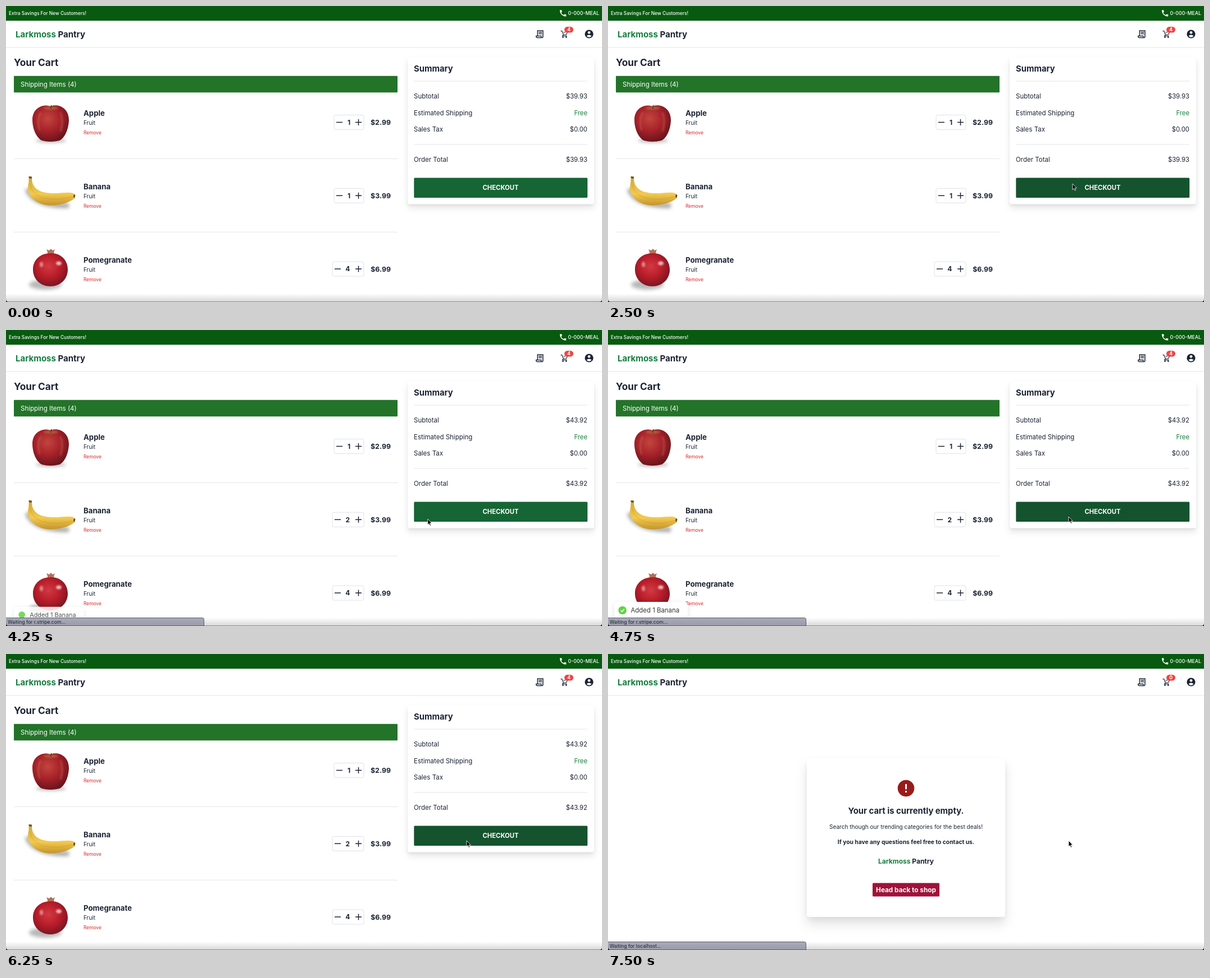
Animation, 1061 px wide and 528 px high, one loop 8000 ms. Source, as an HTML page:

```html
<!DOCTYPE html>
<html lang="en">
<head>
<meta charset="utf-8">
<title>Shopping cart</title>
<style>
  html, body { margin: 0; width: 100%; height: 100%; overflow: hidden; background: #fff; }
  svg { display: block; width: 1061px; height: 528px; font-family: Inter, "Open Sans", sans-serif; }
  text { fill: #1b2434; white-space: pre; }
  .b { font-weight: 700; }
  .m { font-weight: 500; }
  .end { text-anchor: end; }
  .mid { text-anchor: middle; }
  .white { fill: #fff; }
  .green { fill: #15803d; }
  .red { fill: #dc2626; }
  .rule { stroke: #e3e5e8; }
  .ink { fill: none; stroke: #1b2434; stroke-width: 1.5; }
  .thin { stroke-width: 1.2; }
  .card { fill: #fff; filter: drop-shadow(0 7px 6px #00000018) drop-shadow(0 2px 2px #00000010); }
  .toast { fill: #fff; filter: drop-shadow(0 2px 4px #0000001c); }
</style>
</head>
<body>
<svg id="stage" viewBox="0 0 1061 528">
  <defs>
    <radialGradient id="appleSkin" cx=".42" cy=".36" r=".68">
      <stop offset="0" stop-color="#c2453f"/><stop offset=".5" stop-color="#a8222a"/><stop offset="1" stop-color="#64131b"/>
    </radialGradient>
    <radialGradient id="pomSkin" cx=".45" cy=".4" r=".65">
      <stop offset="0" stop-color="#d23a42"/><stop offset=".5" stop-color="#b91d2a"/><stop offset="1" stop-color="#741320"/>
    </radialGradient>
    <linearGradient id="bananaSkin" x2="0" y2="1">
      <stop offset="0" stop-color="#c9a63a"/><stop offset=".6" stop-color="#f3ca4e"/><stop offset="1" stop-color="#c4942c"/>
    </linearGradient>
    <linearGradient id="barFill" x2="0" y2="1">
      <stop offset="0" stop-color="#a9abb8"/><stop offset="1" stop-color="#9799a8"/>
    </linearGradient>
    <linearGradient id="edgeShade" x2="0" y2="1">
      <stop offset="0" stop-opacity="0"/><stop offset="1" stop-opacity=".16"/>
    </linearGradient>
    <filter id="soft" x="-50%" y="-100%" width="200%" height="300%"><feGaussianBlur stdDeviation="3"/></filter>
    <filter id="glow" x="-50%" y="-50%" width="200%" height="200%"><feGaussianBlur stdDeviation="1.4"/></filter>
  </defs>
  <rect width="1061" height="528" fill="#fff"/>
  <g id="header"></g>
  <g id="cart"></g>
  <g id="empty"></g>
  <rect y="513" width="1061" height="15" fill="url(#edgeShade)"/>
  <g id="toast"></g>
  <g id="status"></g>
  <g id="frame">
    <path d="M0 527.5H1061" stroke="#000" stroke-opacity=".35"/>
    <path d="M0 523Q0 528 5 528H0zM1061 523Q1061 528 1056 528H1061z"/>
  </g>
  <path id="cursor" d="M0 0V10.6L2.4 8.4 4.1 12.2 5.8 11.5 4.1 7.8H7.4z" fill="#000" stroke="#fff" stroke-width=".8"/>
</svg>
<script>
const LOOP = 8000;
const $ = id => document.getElementById(id);

const text = (x, y, size, str, cls = "", id = "") =>
  `<text x="${x}" y="${y}" font-size="${size}" class="${cls}" ${id && `id="${id}"`}>${str}</text>`;
const rule = (x1, x2, y) => `<path class="rule" d="M${x1} ${y}H${x2}"/>`;
const rect = (x, y, w, h, attrs) => `<rect x="${x}" y="${y}" width="${w}" height="${h}" ${attrs}/>`;
const brand = '<tspan class="green">Larkmoss</tspan> Pantry';

$("header").innerHTML = `
  ${rect(0, 0, 1061, 26.3, 'fill="#075a10"')}
  ${text(5, 16.3, 8.35, "Extra Savings For New Customers!", "m white")}
  <path transform="translate(984 5.3) scale(.63)" fill="#fff"
    d="M6.6 10.8Q8.9 15.1 13.2 17.4L15.4 15.2Q15.9 14.7 16.4 15 18 15.5 20 15.5 21 15.5 21 16.5V20Q21 21 20 21A17 17 0 0 1 3 4Q3 3 4 3H7.5Q8.5 3 8.5 4 8.5 6 9.1 7.6 9.2 8.1 8.8 8.6z"/>
  ${text(1056, 16, 8.8, "0-000-MEAL", "m white end")}
  ${text(17, 55.5, 15, brand, "b")}
  ${rule(0, 1061, 74)}
  <path class="ink" d="M946.3 53V43.9H955.9V54.6Q955.9 56.4 954.2 56.4H945.4Q943.8 56.4 943.8 54.8V53.4H952.8V55.5M948.2 46.8H954.2M948.2 49.6H954.2"/>
  <path class="ink thin" d="M987.5 44.6H989.7L992.3 51H997.4L999.4 47M992.3 51 990.7 53.4H998.6M992.4 47H996"/>
  <circle class="ink thin" cx="991.5" cy="55.7" r=".8"/><circle class="ink thin" cx="997.3" cy="55.7" r=".8"/>
  ${rect(994, 37, 16, 10.5, 'rx="5.25" fill="#ef4444"')}
  ${text(1002, 45.2, 8.5, "4", "b white mid", "badge")}
  <circle cx="1038" cy="50" r="7.6" fill="#1b2434"/>
  <circle cx="1038" cy="47.3" r="2.4" fill="#fff"/>
  <path d="M1033.4 53.4Q1038 49.6 1042.6 53.4 1038 58.2 1033.4 53.4z" fill="#fff"/>`;

const photos = [
  `<ellipse cx="80" cy="240" rx="27" ry="3" opacity=".35" filter="url(#soft)"/>
   <path d="M79 179C91 174 112 180 112 204 111 222 104 236 95 240Q79 244 64 240C54 235 47 219 47 203 47 181 67 174 79 179z" fill="url(#appleSkin)"/>
   <ellipse cx="80" cy="182" rx="13" ry="3" fill="#b07a48" opacity=".6" filter="url(#glow)"/>
   <path d="M80 183Q79 180 81 177" fill="none" stroke="#55331c" stroke-width="1.5"/>
   <path d="M62 190Q54 203 60 222M97 190Q103 204 97 224" fill="none" stroke="#d98566" stroke-width="3" opacity=".35" filter="url(#glow)"/>`,
  `<path d="M38 326Q48 357 112 356" fill="none" stroke="#000" stroke-opacity=".32" stroke-width="9" filter="url(#soft)"/>
   <path d="M40.5 304L46 304.5Q45.5 314 49 320C55 331 70 334.5 88 334 101 333.5 111 331.5 119 333.5L123.5 337.5 122 343C111 352 94 356 76 355.5 56 354 43 343 39 329 38 322 41.5 316 40.5 304z" fill="url(#bananaSkin)"/>
   <path d="M43 318Q45 334 64 341.5 90 349 119 340" fill="none" stroke="#b98a20" stroke-opacity=".4"/>
   <path d="M40.5 304L46 304.5 45.5 308 41 307zM121 335.5L123.5 337.5 122 343 119.8 340z" fill="#67501c"/>`,
  `<ellipse cx="70" cy="497" rx="29" ry="9" opacity=".28" filter="url(#soft)"/>
   <path d="M74 445Q75 440 72 434L77 436 80 433 83 436 87 434Q84 440 86 446z" fill="#b3705a"/>
   <path d="M79 441C96 440 110 452 110 470 110 488 96 500 79 500 61 500 48 487 48 470 48 452 62 441 79 441z" fill="url(#pomSkin)"/>
   <g fill="#ffe9e6" filter="url(#glow)">
     <ellipse cx="94" cy="459" rx="5" ry="3.5" opacity=".75"/>
     <ellipse cx="63" cy="461" rx="3" ry="5" opacity=".5"/>
   </g>`
];

const stepper = (i, count) => {
  const y = 207.5 + i * 130.8, wide = count > 1 ? 3 : 0;
  return rect(584 - wide, y - 13, 53 + wide, 26, 'rx="3" fill="#fff" stroke="#dfe2e6"') +
    `<path class="ink" d="M${588 - wide} ${y}h11M622 ${y}h11M627.5 ${y - 5.5}v11"/>` +
    text(610.5 - wide * .7, y + 4.2, 12, count, "b mid");
};

const row = (name, price, i) => {
  const y = i * 130.8;
  return photos[i] +
    text(138, 196 + y, 13.2, name, "b") +
    text(138, 212.3 + y, 10, "Fruit") +
    text(138, 229.3 + y, 8.4, "Remove", "red") +
    text(685, 212 + y, 12.4, price, "b end") +
    (i < 2 ? rule(14, 697, 272.5 + y) : "");
};

const summaryLine = (y, label, value, cls = "", id = "") =>
  text(726, y, 11.5, label) + text(1035, y, 11.3, value, "end " + cls, id);

$("cart").innerHTML = `
  ${text(14, 107, 17.2, "Your Cart", "b")}
  ${rect(14, 124.8, 683, 29.4, 'rx="1" fill="#237329"')}
  ${text(26, 143.7, 11.5, "Shipping Items (4)", "white")}
  ${row("Apple", "$2.99", 0)}${row("Banana", "$3.99", 1)}${row("Pomegranate", "$6.99", 2)}
  ${stepper(0, 1)}<g id="bananaCount"></g>${stepper(2, 4)}
  ${rect(715, 92, 332, 261.5, 'rx="4" class="card"')}
  ${text(726, 117, 14.8, "Summary", "b")}
  ${rule(726, 1035, 134)}
  ${summaryLine(165, "Subtotal", "", "", "subtotal")}
  ${summaryLine(194.5, "Estimated Shipping", "Free", "green")}
  ${summaryLine(224, "Sales Tax", "$0.00")}
  ${rule(726, 1035, 247)}
  ${summaryLine(278, "Order Total", "", "", "total")}
  ${rect(726.3, 306.5, 308.9, 35.4, 'rx="1.5" id="checkout"')}
  ${text(880.5, 328.3, 11.3, "CHECKOUT", "b white mid")}`;

$("empty").innerHTML = `
  ${rect(354, 186, 353, 283, 'rx="4" class="card" style="filter:drop-shadow(0 13px 10px #0000001c) drop-shadow(0 4px 4px #0000000c)"')}
  <circle cx="530.5" cy="239.5" r="14.8" fill="#991b1b"/>
  <path d="M530.5 232V241.3M530.5 244V247" stroke="#fff" stroke-width="3"/>
  ${text(530.5, 285, 14.8, "Your cart is currently empty.", "b mid")}
  ${text(530.5, 312.3, 10.1, "Search though our trending categories for the best deals!", "mid")}
  ${text(530.5, 339, 10.3, "If you have any questions feel free to contact us.", "b mid")}
  ${text(530.5, 374, 12, brand, "b mid")}
  ${rect(471, 408.5, 119, 24, 'rx="1.5" fill="#9f1239"')}
  ${text(530.5, 425, 11.8, "Head back to shop", "b white mid")}`;

$("toast").innerHTML = `
  ${rect(11, 485, 131, 29, 'rx="6" class="toast"')}
  <circle cx="25.7" cy="500" r="7.3" fill="#61d345" id="toastDot"/>
  <path id="check" d="M22.6 500.2L25 502.6 29 497.6" fill="none" stroke="#fff" stroke-width="1.5"/>
  <text x="40.5" y="504" font-size="11.4" style="fill:#363636">Added 1 Banana</text>`;

$("status").innerHTML = `
  <path d="M-1 529V513.5H349.5Q352.5 513.5 352.5 516.5V529z" fill="url(#barFill)" stroke="#5d5f68"/>
  ${text(3, 524, 8.7, "", "", "statusText")}`;

// The screen refreshes four times a second, so the pointer hops: [time, x, y]
const hops = [
  [750, 670, 80], [1000, 669.5, 82], [1250, 704.5, 128], [1500, 822, 264], [1750, 822, 268],
  [2000, 826, 283], [2250, 827, 305], [2500, 827, 317], [2750, 827, 320], [3500, 663.5, 354.5],
  [3750, 633, 351], [4000, 624, 346], [4250, 750.7, 337], [4500, 814, 333], [4750, 820, 333]
];

const show = (id, on) => $(id).setAttribute("display", on ? "inline" : "none");
const within = (t, from, to) => t >= from && t < to;

function draw(t) {
  const added = t >= 4250, emptied = t >= 6500;
  const amount = added ? "$43.92" : "$39.93";

  show("cart", !emptied);
  show("empty", emptied);
  $("badge").textContent = emptied ? 0 : 4;
  $("subtotal").textContent = $("total").textContent = amount;
  $("bananaCount").innerHTML = stepper(1, added ? 2 : 1);
  const hover = within(t, 2500, 3500) || t >= 4500;
  $("checkout").setAttribute("fill", hover ? "#14532d" : "#166534");

  const rising = t < 4500;
  show("toast", within(t, 4250, 6250));
  $("toast").setAttribute("transform", rising ? "translate(3.8 33) scale(.95)" : "");
  $("toast").setAttribute("opacity", rising ? .85 : 1);
  $("toastDot").setAttribute("r", rising ? 6.2 : 7.3);
  show("check", t >= 4750);

  show("status", within(t, 4250, 6000) || t >= 7500);
  $("status").setAttribute("opacity", within(t, 5750, 6000) ? .5 : 1);
  $("statusText").textContent = `Waiting for ${emptied ? "localhost" : "r.stripe.com"}...`;

  const hop = hops.filter(h => h[0] <= t).pop();
  show("cursor", hop);
  if (hop) $("cursor").setAttribute("transform", `translate(${hop[1]} ${hop[2]})`);
}

function tick() {
  draw(performance.now() % LOOP);
  requestAnimationFrame(tick);
}
tick();
</script>
</body>
</html>
```
